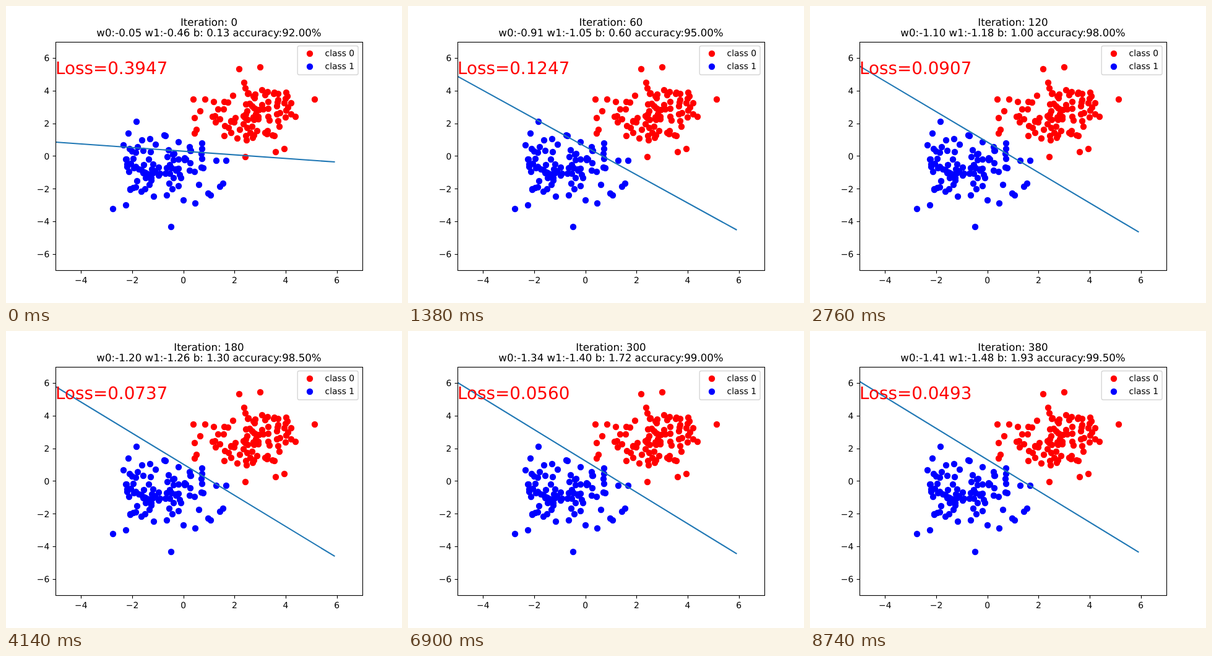
An HTML page for the animation above (9200 ms loop, 640 by 480 pixels).

```html
<!DOCTYPE html>
<html lang="en">
<head>
<meta charset="utf-8">
<title>Logistic regression training</title>
<style>
  html, body { margin: 0; width: 100%; height: 100%; overflow: hidden; background: #fff; }
  svg { display: block; font: 13.889px "DejaVu Sans", sans-serif; text-rendering: geometricPrecision; }
  .middle { text-anchor: middle; }
  .end { text-anchor: end; }
  .title { font-size: 16.667px; text-anchor: middle; }
  .loss { font-size: 27.778px; fill: red; }
  .axis { fill: none; stroke: #000; stroke-width: 1.11; }
  .boundary { stroke: #1f77b4; stroke-width: 2.083; stroke-linecap: square; }
  .legend { fill: #fff; fill-opacity: .8; stroke: #ccc; stroke-opacity: .8; stroke-width: 1.39; }
</style>
</head>
<body>
<svg width="640" height="480" viewBox="0 0 640 480">
  <clipPath id="plot"><rect x="80" y="57.6" width="496" height="369.6"/></clipPath>
</svg>
<script>
const STEP_MS = 460, STEPS = 20, STEP_ITERATIONS = 20;
const CLASSES = [
  { color: 'red', mean: 2.7, label: 0 },
  { color: 'blue', mean: -0.7, label: 1 }
];

const svg = document.querySelector('svg');
const toX = x => 80 + (x + 5) / 12 * 496;
const toY = y => 427.2 - (y + 7) / 14 * 369.6;
const snap = v => Math.round(v) + 0.5;

function add(tag, attributes, text = '') {
  const node = document.createElementNS('http://www.w3.org/2000/svg', tag);
  for (const key in attributes) node.setAttribute(key, attributes[key]);
  node.textContent = text;
  return svg.appendChild(node);
}
const addText = (x, y, text, name) => add('text', { x, y, class: name }, text);
const addDot = (cx, cy, fill) => add('circle', { cx, cy, r: 5.2, fill });

// Mersenne Twister giving 24-bit uniform values in [0, 1).
function twister(seed) {
  const size = 624, state = new Uint32Array(size);
  state[0] = seed;
  for (let i = 1; i < size; i++) {
    const last = state[i - 1];
    state[i] = Math.imul(1812433253, last ^ (last >>> 30)) + i;
  }
  let i = 0;
  return () => {
    const mixed = (state[i] & 0x80000000) | (state[(i + 1) % size] & 0x7fffffff);
    state[i] = state[(i + 397) % size] ^ (mixed >>> 1) ^ (mixed & 1 ? 0x9908b0df : 0);
    let y = state[i];
    i = (i + 1) % size;
    y ^= y >>> 11;
    y ^= (y << 7) & 0x9d2c5680;
    y ^= (y << 15) & 0xefc60000;
    y ^= y >>> 18;
    return (y & 0xffffff) / 0x1000000;
  };
}
const random = twister(10);

// Box-Muller in blocks of 16; a partial last block is redrawn over the tail.
function normals(count) {
  const values = Array.from({ length: count }, random);
  const transform = start => {
    for (let j = start; j < start + 8; j++) {
      const radius = Math.sqrt(-2 * Math.log(1 - values[j]));
      const angle = 2 * Math.PI * values[j + 8];
      values[j] = radius * Math.cos(angle);
      values[j + 8] = radius * Math.sin(angle);
    }
  };
  for (let start = 0; start + 16 <= count; start += 16) transform(start);
  if (count % 16) {
    for (let j = count - 16; j < count; j++) values[j] = random();
    transform(count - 16);
  }
  return values;
}

const points = CLASSES.flatMap(({ color, mean, label }) => {
  const values = normals(200);
  return Array.from({ length: 100 }, (_, k) =>
    ({ x: values[2 * k] + mean, y: values[2 * k + 1] + mean, label, color }));
});

// Logistic regression by gradient descent with momentum.
function train() {
  const history = [], velocity = [0, 0, 0];
  const weights = velocity.map(() => (2 * random() - 1) * Math.SQRT1_2);
  for (let iteration = 0; history.length < STEPS; iteration++) {
    const gradient = [0, 0, 0];
    let loss = 0, correct = 0;
    for (const { x, y, label } of points) {
      const p = 1 / (1 + Math.exp(-(weights[0] * x + weights[1] * y + weights[2])));
      loss -= Math.log(label ? p : 1 - p) / points.length;
      correct += (p >= 0.5) == label;
      [x, y, 1].forEach((input, k) => gradient[k] += (p - label) * input / points.length);
    }
    gradient.forEach((g, k) => {
      velocity[k] = 0.9 * velocity[k] + g;
      weights[k] -= 0.01 * velocity[k];
    });
    if (iteration % STEP_ITERATIONS == 0)
      history.push({ iteration, loss, accuracy: correct / points.length, weights: [...weights] });
  }
  return history;
}
const history = train();

for (const { x, y, color } of points) addDot(Math.round(toX(x)), Math.round(toY(y)), color);
const boundary = add('line', { class: 'boundary', 'clip-path': 'url(#plot)' });

add('rect', { x: 80.5, y: 58.5, width: 496, height: 369, class: 'axis' });
const tickLabel = v => String(v).replace('-', '\u2212');
for (let v = -6; v <= 6; v += 2) {
  const x = toX(v), y = toY(v);
  add('path', { d: `M80.5 ${snap(y)}h-4.9`, class: 'axis' });
  addText(70.3, Math.round(y + 5.3), tickLabel(v), 'end');
  if (v < -4) continue;
  add('path', { d: `M${snap(x)} 427.5v4.9`, class: 'axis' });
  addText(x, 448, tickLabel(v), 'middle');
}

const heading = addText(328, 32, '', 'title');
const summary = addText(328, 49, '', 'title');
const lossText = addText(80, 110, '', 'loss');

add('rect', { x: 471.2, y: 64.5, width: 97.9, height: 46.8, rx: 2.8, class: 'legend' });
CLASSES.forEach(({ color, label }, row) => {
  addDot(491, 77 + 21 * row, color);
  addText(515.5, 81 + 21 * row, `class ${label}`);
});

function show({ iteration, loss, accuracy, weights }) {
  const [w0, w1, b] = weights, lineY = x => toY(-(w0 * x + b) / w1);
  const ends = { x1: toX(-6), y1: lineY(-6), x2: toX(5.9), y2: lineY(5.9) };
  for (const key in ends) boundary.setAttribute(key, ends[key]);
  heading.textContent = `Iteration: ${iteration}`;
  summary.textContent = `w0:${w0.toFixed(2)} w1:${w1.toFixed(2)} b: ${b.toFixed(2)} `
    + `accuracy:${(accuracy * 100).toFixed(2)}%`;
  lossText.textContent = `Loss=${loss.toFixed(4)}`;
}

const begin = performance.now();
let shown = -1;
function tick() {
  const step = Math.floor((performance.now() - begin) / STEP_MS) % STEPS;
  if (step != shown) show(history[shown = step]);
  requestAnimationFrame(tick);
}
tick();
</script>
</body>
</html>
```
